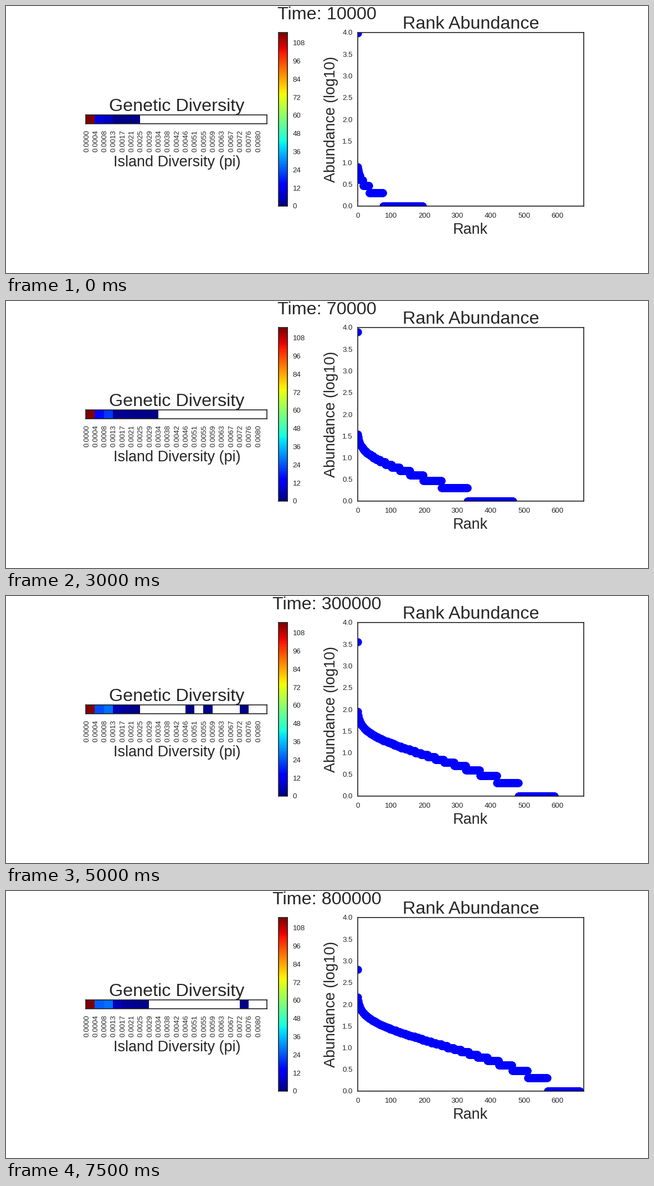
Write a matplotlib script that moves like this. It is 1159 px wide and 483 px high and loops after 8 s.

```python
import numpy as np
import matplotlib.pyplot as plt
from matplotlib.animation import FuncAnimation

W, H, DPI = 1159, 483, 64
PT = 72 / DPI  # points per pixel
INK = "#262626"
BLUE = "#0000ff"
VMAX = 114.8
CELLS = 20

plt.rcParams["font.family"] = "Liberation Sans"

# Simulated time in units of 10000: fine steps first, then coarse ones
TIMES = [n for n in range(1, 10) if n != 8] + list(range(10, 81, 10))

# Number of species at a few steps
STEPS = [0, 1, 4, 6, 8, 10, 12, 15]
SPECIES = [196, 340, 450, 467, 514, 592, 641, 668]

# Rare bins holding one species: first bin, end bin, first step, end step
RARE = [(10, 11, 2, 3), (6, 8, 6, 8), (7, 9, 8, 10), (14, 16, 8, 10),
        (11, 12, 10, 12), (13, 14, 10, 14), (17, 18, 10, 16),
        (6, 10, 12, 14), (6, 7, 14, 16)]


def curve(step):
    """Rank and log10 abundance: one dominant species, then a Weibull tail."""
    t = TIMES[step]
    total = int(np.interp(step, STEPS, SPECIES))
    rate = 0.11 + 0.84 * t ** -0.65
    power = 0.88 - 0.028 * np.log(t)
    rank = np.arange(1, total + 1)
    depth = -np.log((rank - 0.3) / total).clip(max=0)
    depth = np.log(total / (rank - 0.3)).clip(min=0)
    count = np.floor(1 + (depth / rate) ** (1 / power))
    dominant = 4 - 0.0149 * t
    return np.column_stack([np.append(0, rank),
                            np.append(dominant, np.log10(count))])


def bins(step):
    """Species per diversity bin; the low bins fill up towards a limit."""
    def fill(limit, gap, tau):
        return round(limit - gap * np.exp(-TIMES[step] / tau))

    row = np.zeros(CELLS)
    row[:6] = [VMAX, fill(25, 16, 14), fill(27, 24, 5),
               fill(6, 5, 20), fill(3, 2, 15), fill(2, 1, 60)]
    for left, right, start, end in RARE:
        if start <= step < end:
            row[left:right] = 1
    return np.ma.masked_equal(row[None, :], 0)


fig = plt.figure(figsize=(W / DPI, H / DPI), dpi=DPI, facecolor="white")


def panel(left, top, right, bottom):
    ax = fig.add_axes([left / W, 1 - bottom / H,
                       (right - left) / W, (bottom - top) / H])
    ax.set(xticks=[], yticks=[])
    for spine in ax.spines.values():
        spine.set(color=INK, linewidth=1.7 * PT)
    return ax


def label(x, y, text, size=13.3, ha="center", rotation=0):
    """Text whose baseline sits at pixel (x, y)."""
    return fig.text(x / W, 1 - y / H, text, fontsize=size * PT, color=INK,
                    ha=ha, va="baseline", rotation=rotation,
                    rotation_mode="anchor")


# Genetic diversity strip
strip = panel(144.2, 197, 471, 213.3)
heat = strip.imshow(bins(0), cmap="jet", vmin=0, vmax=VMAX, aspect="auto",
                    interpolation="nearest")
label(308, 190, "Genetic Diversity", 32.4)
label(308.5, 290, "Island Diversity (pi)", 27)
for i in range(CELLS):
    label(149 + i * 16.33, 244, f"{i * 0.000421:.4f}", 13, rotation=90)

# Colour bar
bar = panel(491.5, 48, 508, 362)
bar.imshow(np.linspace(0, 1, 256)[:, None], cmap="jet", aspect="auto",
           origin="lower", interpolation="nearest")
for n in range(0, 109, 12):
    label(517.8, 366.5 - n * 2.735, str(n), ha="left")

# Rank abundance plot
plot = panel(634.5, 48, 1043, 362)
plot.set(xlim=(0, 680), ylim=(0, 4))
dots = plot.scatter([], [], s=(14.4 * PT) ** 2, c=BLUE, linewidths=0)
label(839, 41, "Rank Abundance", 32.4)
label(838.5, 412, "Rank", 27)
label(593.5, 205.2, "Abundance (log10)", 27, rotation=90)
for n in range(0, 601, 100):
    label(635 + n * 0.6, 383, str(n))
for i in range(9):
    label(625.7, 366.5 - i * 39.25, f"{i / 2:.1f}", ha="right")

clock = label(579.5, 24.3, "", 32.4)


def update(step):
    clock.set_text(f"Time: {TIMES[step] * 10000}")
    heat.set_data(bins(step))
    dots.set_offsets(curve(step))
    return clock, heat, dots


anim = FuncAnimation(fig, update, frames=len(TIMES), interval=500,
                     repeat=True, repeat_delay=0)
plt.show()
```
